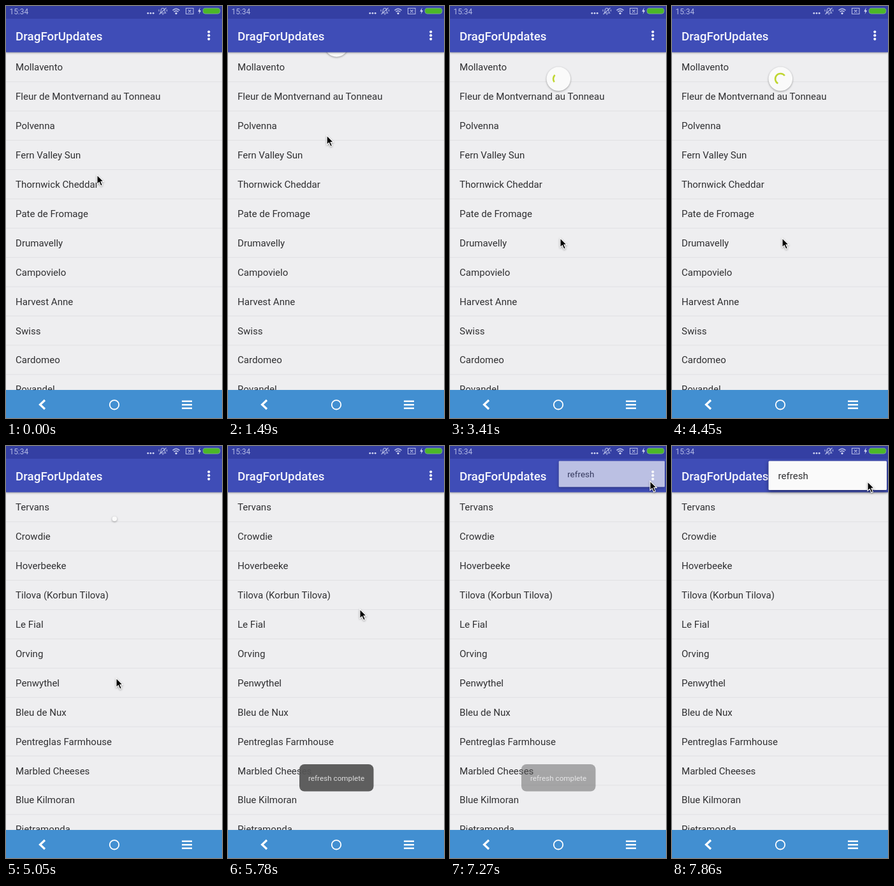
Animation, 339 px wide and 646 px high, one loop 8 s. Source, as an HTML page:

```html
<!DOCTYPE html>
<html lang="en">
<head>
<meta charset="utf-8">
<title>Pull to refresh</title>
<style>
html, body { margin: 0; width: 100%; height: 100%; overflow: hidden; background: #eeeef0; }
svg { display: block; width: 339px; height: 646px; font: 15.07px Roboto, sans-serif; fill: #303032; }
.line { fill: none; stroke: #b4bbe6; stroke-width: 1.1; }
.shade { filter: drop-shadow(0 1px 1.6px rgba(0, 0, 0, .36)); }
.deep { filter: drop-shadow(0 2px 3px rgba(0, 0, 0, .45)); }
</style>
</head>
<body>
<svg viewBox="0 0 339 646">
  <rect width="339" height="646" fill="#eeeef0"/>
  <g id="dividers" fill="#e0e0e3"></g>
  <g id="before"></g>
  <g id="after"></g>

  <g class="shade">
    <g id="spinner">
      <circle r="18.8" fill="#fafafa"/>
      <g id="ring">
        <path id="arc" fill="none" stroke="#bfd630" stroke-width="2.5"/>
        <path id="arrow" d="M-4.7 0H4.7L0 4.7Z" fill="#bfd630"/>
      </g>
    </g>
  </g>

  <rect class="shade" y="20" width="339" height="52.5" fill="#3f4db7"/>
  <rect width="339" height="20" fill="#343fa3"/>
  <text x="15" y="53.8" font-size="18.8" font-weight="500" fill="#f6f7fd">DragForUpdates</text>
  <g fill="#f6f7fd">
    <circle cx="318.3" cy="40.6" r="2.1"/><circle cx="318.3" cy="46.2" r="2.1"/><circle cx="318.3" cy="51.8" r="2.1"/>
  </g>

  <!-- status bar -->
  <text x="5.5" y="13" font-size="11.9" fill="#b4bbe6">15:34</text>
  <g fill="#d5d9f4">
    <circle cx="222.8" cy="11.3" r="1.4"/><circle cx="227" cy="11.3" r="1.4"/><circle cx="231.2" cy="11.3" r="1.4"/>
    <path d="M304.5 2.5L301.3 8.8H303.6L302.6 13L306.2 7H304Z"/>
    <circle cx="267" cy="11.6" r="1.6"/>
  </g>
  <g class="line">
    <path d="M242 11H250.5Q249 9.5 249 6.5Q248.5 3.5 246 3.5Q243.5 3.5 243.3 6.500Q243 9.5 242 11M245 13H247.5M251.5 3L240.500 13M240 5.500V8.500M252.500 5.500V8.500"/>
    <path d="M261.5 6.8Q267 1.8 272.5 6.8M263.5 9.2Q267 6 270.5 9.2" stroke-width="1.7"/>
    <path d="M282.5 3.5H294V12.5H282.5ZM286 6L290.5 10.300M290.5 6L286 10.3"/>
  </g>
  <rect x="309" y="3.3" width="27" height="9" rx="4" fill="#4cb827" stroke="#7f9fb4" stroke-width=".8"/>

  <!-- navigation bar -->
  <rect y="602" width="339" height="44" fill="#428fd1"/>
  <g fill="none" stroke="#fff" stroke-width="2.4">
    <path d="M61 618L53.500 625L61 632" stroke-width="3.2"/>
    <circle cx="170" cy="625.3" r="7.2" stroke-width="1.8"/>
    <path d="M276 619.800H292M276 625.300H292M276 630.800H292"/>
  </g>

  <g id="toast">
    <rect x="112" y="499" width="116.5" height="42.5" rx="8" fill="#555" fill-opacity=".94"/>
    <text x="126" y="525" font-size="11.7" fill="#dcdcdc">refresh complete</text>
  </g>
  <g id="menu">
    <rect class="deep" x="151.5" y="23.5" width="185.5" height="45.5" rx="1.5" fill="#fafafa"/>
    <text x="166.5" y="52">refresh</text>
  </g>
  <path id="cursor" class="shade" d="M0 0V14.3L3.3 11.3L5.8 17L8.3 15.9L5.9 10.4H10.3Z" stroke="#fff" stroke-width="1.1" style="fill:#000"/>
</svg>
<script>
const LOOP = 8000, STEP = 148, ROW = 45.9;
const $ = id => document.getElementById(id);
const set = (id, name, value) => $(id).setAttribute(name, value);
const clamp = v => Math.max(0, Math.min(1, v));
const ease = v => v * v * (3 - 2 * v);
const ramp = (k, a, b) => clamp((k - a) / (b - a));

const lists = {
  before: ["Mollavento", "Fleur de Montvernand au Tonneau", "Polvenna", "Fern Valley Sun",
    "Thornwick Cheddar", "Pate de Fromage", "Drumavelly", "Campovielo", "Harvest Anne",
    "Swiss", "Cardomeo", "Rovandel"],
  after: ["Tervans", "Crowdie", "Hoverbeeke", "Tilova (Korbun Tilova)", "Le Fial", "Orving",
    "Penwythel", "Bleu de Nux", "Pentreglas Farmhouse", "Marbled Cheeses", "Blue Kilmoran",
    "Pietramonda"]
};
for (const id in lists)
  $(id).innerHTML = lists[id].map((s, i) => `<text x="15" y="${101.4 + i * ROW}">${s}</text>`).join("");
$("dividers").innerHTML = lists.before.map((_, i) =>
  `<rect y="${118.3 + i * ROW}" width="339" height="1"/>`).join("");

// pointer path: step, x, y
const path = [[3, 143, 265], [7, 153, 180], [9, 153, 180], [16, 168, 342], [17, 170, 352],
  [18, 173, 364], [38, 173, 364], [39, 207, 256], [41, 258, 125], [43, 295, 68], [45, 306, 59],
  [46, 314, 55], [52, 314, 55], [53, 307, 56]];

function pointer(k) {
  const i = path.findIndex(p => p[0] >= k);
  if (i <= 0) return path[0].slice(1);
  const [a, x, y] = path[i - 1], [b, u, v] = path[i], f = ramp(k, a, b);
  return [x + (u - x) * f, y + (v - y) * f];
}

// start and end angle of the ring, in degrees
function angles(k, pull) {
  if (k < 19) return [62 - 72 * (1 - pull), 62 - 72 * (1 - pull) + 288 * pull];
  if (k < 23) {
    const f = ramp(k, 18.5, 23);
    return [62 + 441 * f, 350 + 237 * f];
  }
  const turns = (k - 23) * STEP / 1332, n = Math.floor(turns), p = turns - n;
  const base = 504 * n + 216 * p;
  return [503 + base + 288 * ease(clamp(2 * p - 1)), 587 + base + 288 * ease(clamp(2 * p))];
}

function drawSpinner(k, y) {
  const drag = k < 10 ? 0 : Math.max(0, y - 190) / 2;
  const pull = clamp(drag / 60);
  const over = Math.max(0, drag - 60) * 0.75 * (1 - ease(ramp(k, 18, 20)));
  const size = k < 34 ? 1 : k < 35 ? 0.2 : 0;
  $("spinner").style.display = drag && size ? "" : "none";
  set("spinner", "transform", `translate(170.3 ${54.3 + 60 * pull + over}) scale(${size})`);
  const [from, to] = angles(k, pull), r = 8.24;
  const at = d => [Math.cos(d * Math.PI / 180) * r, Math.sin(d * Math.PI / 180) * r];
  set("arc", "d", `M${at(from)}A${r} ${r} 0 ${to - from > 180 ? 1 : 0} 1 ${at(to)}`);
  set("arrow", "transform", `rotate(${to}) translate(${r} 0) scale(${pull})`);
  $("arrow").style.display = k < 19 ? "" : "none";
  set("ring", "opacity", k < 19 ? 0.3 + 0.5 * pull : k < 34 ? 1 : 0);
}

function draw(now) {
  const k = Math.min(53, Math.floor(now % LOOP / STEP));
  const [x, y] = pointer(k);
  set("cursor", "transform", `translate(${x} ${y})`);
  drawSpinner(k, k < 38 ? y : 0);
  $("before").style.display = k < 33 ? "" : "none";
  $("after").style.display = k < 33 ? "none" : "";
  set("toast", "opacity", ramp(k, 34, 37) * (1 - ramp(k, 47, 51)));
  const open = ramp(k, 47, 50), grow = 0.6 + 0.4 * ease(open);
  set("menu", "opacity", open);
  set("menu", "transform", `translate(337 23) scale(${grow}) translate(-337 -23)`);
  requestAnimationFrame(draw);
}
requestAnimationFrame(draw);
</script>
</body>
</html>
```
